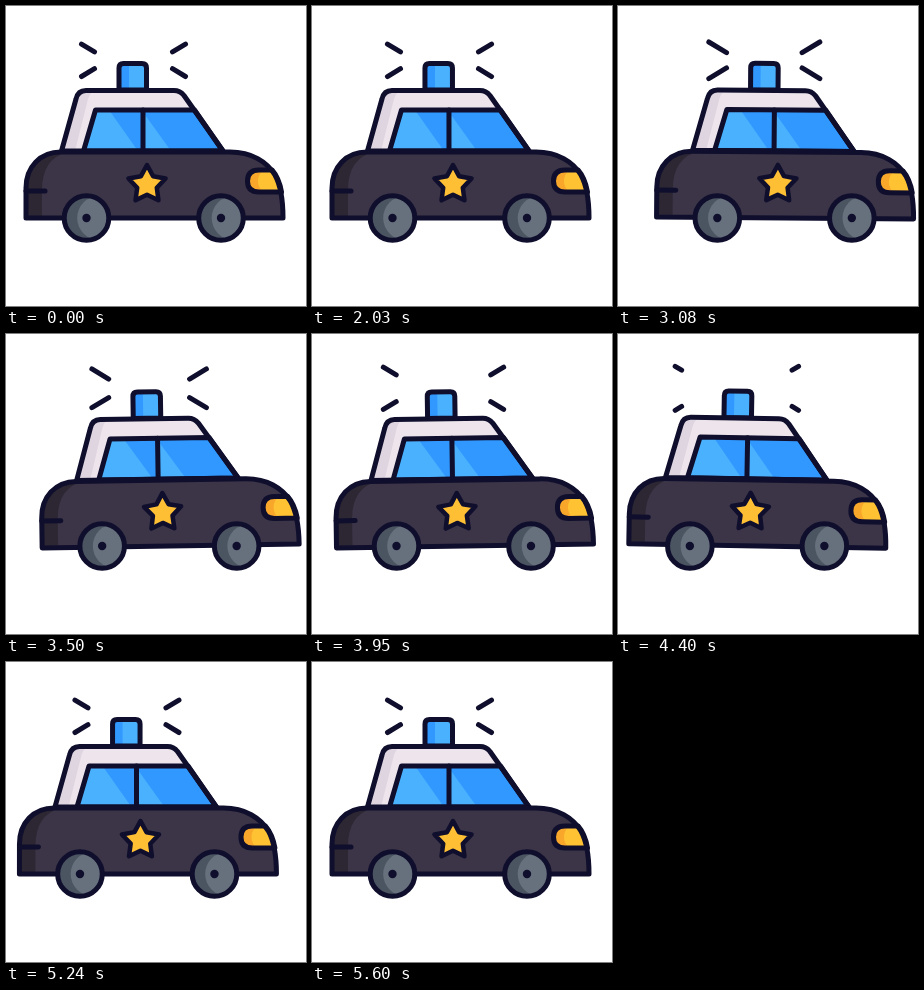
An HTML page that plays this animation: 300x300 px, repeating every 5630 ms.

```html
<!DOCTYPE html>
<html lang="en">
<head>
<meta charset="utf-8">
<title>Police car</title>
<style>
html, body { margin: 0; width: 100%; height: 100%; overflow: hidden; background: #fff; }
svg { display: block; width: 100vw; height: 100vh; }
.ink { fill: none; stroke: #0f0e2c; stroke-width: 5; stroke-linecap: round; stroke-linejoin: round; }
</style>
</head>
<body>
<svg viewBox="0 0 300 300">
  <defs>
    <path id="body" d="M20 212V182C20 161 34 146 55 146H224C246 146 261 156 269 169C275 180 277 195 277 212Z"/>
    <path id="glass" d="M89.500 104H188.500L217 145H77.500Z"/>
    <path id="lamp" d="M266 164H253Q241.500 164 241.500 175Q241.500 186 253 186H275.500Q273 172 266 164Z"/>
    <path id="beacon" d="M113 84V62Q113 57.500 117.500 57.500H136Q140.500 57.500 140.500 62V84Z"/>
    <path id="roof" d="M55.500 145L70 93Q72 84.500 80 84.500H168Q174 84.500 178 89.500L217 145Z"/>
    <clipPath id="glassClip"><use href="#glass"/></clipPath>
    <clipPath id="bodyClip"><use href="#body"/></clipPath>
    <clipPath id="lampClip"><use href="#lamp"/></clipPath>
    <clipPath id="roofClip"><use href="#roof"/></clipPath>
    <clipPath id="tireClip"><circle r="22.300"/></clipPath>
    <g id="wheel">
      <circle r="22.300" fill="#4b5562"/>
      <circle cx="13" r="22.300" fill="#67717d" clip-path="url(#tireClip)"/>
      <circle class="ink" r="22.300"/>
      <circle r="4.200" fill="#0f0e2c"/>
    </g>
  </defs>
  <g id="car">
    <g id="shell">
      <use href="#beacon" fill="#4ab1ff"/>
      <path d="M113 84V62Q113 57.500 117.500 57.500H123V84Z" fill="#3098ff"/>
      <use href="#beacon" class="ink"/>
      <use href="#roof" fill="#ede4ec"/>
      <path d="M55 145L70 84H92Q84 85 82 93L69 145Z" fill="#dfd5e1" clip-path="url(#roofClip)"/>
      <use href="#glass" fill="#3098ff"/>
      <g clip-path="url(#glassClip)" fill="#4ab1ff">
        <path d="M76 104H103L132 145H76Z"/>
        <path d="M137 106L165 145H137Z"/>
      </g>
      <use href="#roof" class="ink"/>
      <use href="#glass" class="ink"/>
      <path class="ink" d="M137 104V145"/>
      <use href="#body" fill="#3c3447"/>
      <path d="M18 214V145H66Q36 150 36 184V214Z" fill="#2c2733" clip-path="url(#bodyClip)"/>
      <use href="#lamp" fill="#ffc233"/>
      <path d="M240 162H260Q252 167 252 175Q252 183 260 188H240Z" fill="#f9a72b" clip-path="url(#lampClip)"/>
      <use href="#lamp" class="ink"/>
      <use href="#body" class="ink"/>
      <path class="ink" d="M20 185H39"/>
      <path id="star" class="ink" style="fill:#ffbf35;stroke-width:4.5"/>
    </g>
    <use href="#wheel" x="80.500" y="212"/>
    <use href="#wheel" x="215" y="212"/>
    <path id="rays" class="ink"/>
  </g>
</svg>
<script>
const LOOP = 5630, START = 2030, RIGHT = 3150, LEFT = 4850, END = 5600;
const BEAT = 396, FIRST = 2462, LAST = FIRST + 6 * BEAT, SWAY = 357;
const el = id => document.getElementById(id);
const [car, shell, rays] = ['car', 'shell', 'rays'].map(el);
const mix = (a, b, p) => a + (b - a) * p;
const glide = (t, t0, t1, a, b) => mix(a, b, (1 - Math.cos(Math.PI * (t - t0) / (t1 - t0))) / 2);

const points = Array.from({ length: 10 }, (_, i) => {
  const r = i % 2 ? 10.3 : 19.5, a = Math.PI * (i / 5 - 0.5);
  return (141 + r * Math.cos(a)).toFixed(2) + ' ' + (178.5 + r * Math.sin(a)).toFixed(2);
});
el('star').setAttribute('d', 'M' + points.join('L') + 'Z');

function shift(t) {
  if (t <= START || t >= END) return 0;
  if (t < RIGHT) return glide(t, START, RIGHT, 0, 19);
  if (t < LEFT) return glide(t, RIGHT, LEFT, 19, -14);
  return glide(t, LEFT, END, -14, 0);
}

function tilt(t) {
  return t <= START || t >= END ? 0 : -1.25 * Math.sin(2 * Math.PI * (t - START) / SWAY);
}

// Inner and outer reach of each ray, measured from the beacon's axis.
function reach(t) {
  if (t <= START || t >= END) return [39, 52];
  const tail = p => Math.pow(p, 1.85), tip = p => 1 - Math.pow(1 - p, 2.1);
  if (t < FIRST) {
    const p = (t - START) / (FIRST - START);
    return [mix(39, 62, tail(p)), mix(52, 62, tip(p))];
  }
  const last = t >= LAST;
  const p = last ? Math.min(1, (t - LAST) / BEAT) : (t - FIRST) % BEAT / BEAT;
  const a = mix(25, 62, tail(p)), b = mix(25, 62, tip(p));
  return last ? [Math.min(a, 39), Math.min(b, 52)] : [a, b];
}

function rayPath([a, b]) {
  if (b - a < 0.5) return '';
  let d = '';
  for (const sx of [-1, 1]) for (const sy of [-1, 1]) {
    const at = u => (127.5 + sx * u) + ' ' + (54.3 + sy * (u - 25) * 0.6);
    d += 'M' + at(a) + 'L' + at(b);
  }
  return d;
}

function draw(t) {
  car.setAttribute('transform', `translate(${shift(t)} 0)`);
  shell.setAttribute('transform', `rotate(${tilt(t)} 148 178)`);
  rays.setAttribute('d', rayPath(reach(t)));
}

const begin = performance.now();
function tick() {
  draw((performance.now() - begin) % LOOP);
  requestAnimationFrame(tick);
}
tick();
</script>
</body>
</html>
```
